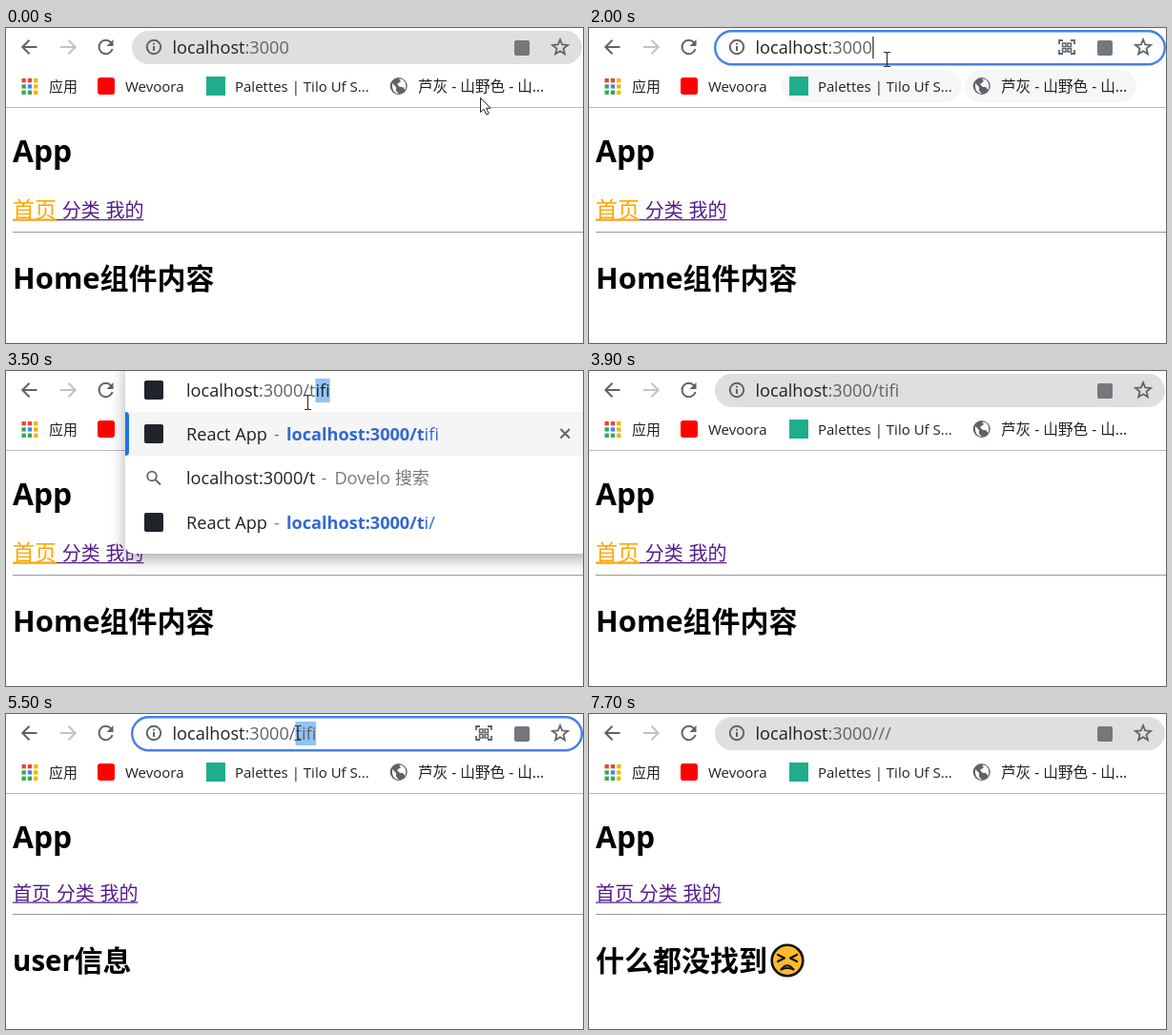
An HTML page for the animation above (8 s loop, 605 by 331 pixels).

```html
<!DOCTYPE html>
<html lang="zh-CN">
<head>
<meta charset="utf-8">
<title>App</title>
<style>
html, body { margin: 0; width: 100%; height: 100%; overflow: hidden; background: #fff; }
svg { display: block; width: 605px; height: 331px; }
text { font-family: 'Open Sans', 'Noto Sans CJK SC', 'Noto Sans CJK', sans-serif; white-space: pre; }
.menu { filter: drop-shadow(0 6px 8px rgba(60, 60, 70, .42)); }
</style>
</head>
<body>
<svg id="stage" viewBox="0 0 605 331" xmlns="http://www.w3.org/2000/svg"></svg>
<script>
const LOOP = 8000, STEP = 100, SIZE = 18.15;
const INK = '#202124', GREY = '#5f6368', PALE = '#777b80', BLUE = '#3367d6';
const VISITED = '#551a8b', ORANGE = '#ffa500', MARK = '#90c3f8';
const HOST = 'localhost', PORT = ':3000', NAME = 'tifi', FIND = 'Dovelo 搜索';
const stage = document.getElementById('stage');
const pen = document.createElement('canvas').getContext('2d');

const width = (s, size = SIZE) => {
  pen.font = `${size}px 'Open Sans', 'Noto Sans CJK SC', sans-serif`;
  return pen.measureText(s).width;
};
const text = (x, y, s, size = SIZE, fill = INK, weight = 400) =>
  `<text x="${x}" y="${y}" font-size="${size}" fill="${fill}" font-weight="${weight}">${s}</text>`;
const span = (s, fill, weight = 400) => `<tspan fill="${fill}" font-weight="${weight}">${s}</tspan>`;
const rect = (x, y, w, h, fill, rx = 0, more = '') =>
  `<rect x="${x}" y="${y}" width="${w}" height="${h}" fill="${fill}" rx="${rx}" ${more}/>`;
const line = (d, stroke, w = 2, more = '') =>
  `<path d="${d}" fill="none" stroke="${stroke}" stroke-width="${w}" ${more}/>`;
const circle = (x, y, r, fill, more = '') => `<circle cx="${x}" cy="${y}" r="${r}" fill="${fill}" ${more}/>`;

// last entry whose time has been reached
const at = (list, t) => list.reduce((hit, e) => e[0] <= t ? e : hit);

const pages = [[0, 'Home'], [800, 'Mine'], [1000, 'Category'], [1500, 'Home'], [4000, 'user'], [6800, 'none']];

// time, path, first selected character, end of selection
const address = [
  [0, ''], [800, '/mine'], [1000, '/category'], [1500, ''],
  [2100, '', 0, 14], [2300, '', 10, 14], [2800, ''], [3000, '/'],
  [3500, '/' + NAME, 16, 19], [3600, '/' + NAME, 17, 19], [3700, '/' + NAME],
  [5100, '/' + NAME, 18, 19], [5200, '/' + NAME, 17, 19], [5300, '/' + NAME, 16, 19],
  [5400, '/' + NAME, 15, 19], [6200, '//'], [6300, '///', 16, 17], [6700, '///']
];
const focus = [[0, 0], [1900, 1], [3900, 0], [4900, 1], [6700, 0]];

// time, typed path, completions (empty string marks the search row)
const menus = [
  [0], [3000, '/', ['category', '', NAME, 'mine', 'ti/', 'category', 'mine']],
  [3500, '/t', ['ifi', '', 'i/']], [3600, '/ti', ['fi', '', '/']], [3700, '/tifi', ['/', '', '/asd']],
  [3900], [6200, '//', ['/', '', '周七/asd asd']], [6700]
];

const cursors = [
  [0, 'arrow', 497, 73], [100, 'arrow', 511, 77], [200, 'arrow', 496, 78], [300, 'arrow', 398, 108],
  [400, 'arrow', 280, 136], [500, 'arrow', 194, 157], [600, 'arrow', 159, 169], [700, 'hand', 126, 188],
  [900, 'hand', 106, 189], [1000, 'hand', 82, 188], [1200, 'hand', 64, 189], [1300, 'hand', 44, 189],
  [1400, 'hand', 36, 189], [1600, 'arrow', 146, 146], [1700, 'arrow', 232, 92], [1800, 'arrow', 288, 56],
  [1900, 'beam', 309, 36], [2000, 'beam', 312.5, 33], [2200, 'beam', 316.5, 33], [3600, ''],
  [4700, 'beam', 316.5, 30.5], [4900, 'beam', 322, 26], [5000, 'beam', 327, 22], [5200, 'beam', 321, 21],
  [5300, 'beam', 315, 20], [5400, 'beam', 309, 20], [5500, 'beam', 306, 20], [6700, ''],
  [7200, 'beam', 306, 20], [7300, 'arrow', 400, 76], [7400, 'arrow', 474, 121],
  [7500, 'arrow', 489, 121], [7600, 'arrow', 564, 77], [7700, '']
];

const shapes = {
  arrow: '<path d="M.5 .5V15.5L4 12.2L6.6 18L9.2 16.9L6.7 11.2H11Z" fill="#fff" stroke="#222" stroke-width="1"/>',
  hand: '<path d="M-2 1.3C-2-.6 1-.6 1 1.3V8C1 6.3 4 6.3 4 8.2C4 6.9 7 7 7 9C7 8 9.5 8.2 9.5 10V16Q9.5 19 7.5 21V23H-1V21L-6.5 14C-8 11.7-5.3 10.6-4 12L-2 14.2Z" fill="#fff" stroke="#222" stroke-width="1.2"/><path d="M1 8V12M4 8.5V12M7 9.5V12" stroke="#222"/>',
  beam: '<path d="M-3.5-7.5H-1L0-6.5L1-7.5H3.5M0-6.5V6.5M-3.5 7.5H-1L0 6.5L1 7.5H3.5" fill="none" stroke="#333" stroke-width="1.2"/>'
};

function star(x, y) {
  const pts = Array.from({ length: 10 }, (_, i) => {
    const r = i % 2 ? 3.7 : 8.4, a = i * Math.PI / 5 - Math.PI / 2;
    return (x + r * Math.cos(a)).toFixed(1) + ',' + (y + r * Math.sin(a)).toFixed(1);
  });
  return `<polygon points="${pts.join(' ')}" fill="none" stroke="${GREY}" stroke-width="1.8"/>`;
}

function navIcons() {
  return line('M32.5 20H18M24.5 12.8L17.3 20L24.5 27.2', GREY) +
    line('M57 20H72M65.5 12.8L72.7 20L65.5 27.2', '#c0c3c7') +
    line('M110.2 15.3A7.2 7.2 0 1 0 111.6 22', GREY) +
    `<path d="M112.5 12V19H105.5Z" fill="${GREY}"/>`;
}

function scanIcon() {
  let s = line('M493 17V13H497M505 13H509V17M509 23V27H505M497 27H493V23', GREY, 1.8);
  for (const x of [496.5, 502]) for (const y of [16, 21.5]) s += rect(x, y, 3.5, 3.5, 'none', 0, `stroke="${GREY}" stroke-width="1.5"`);
  return s;
}

function selection(x, url, from, to) {
  if (from === undefined) return '';
  const a = x + width(url.slice(0, from)), b = x + width(url.slice(0, to));
  return rect(a, 8, b - a, 25, MARK);
}

function urlText(x, [, path, from, to], chosenInk) {
  const rest = PORT + path, cut = from - HOST.length;
  const tail = chosenInk && cut > 0 ? span(rest.slice(0, cut), GREY) + span(rest.slice(cut), INK) : span(rest, GREY);
  return selection(x, HOST + rest, from, to) + text(x, 26.5, span(HOST, INK) + tail);
}

function addressBar(entry, focused) {
  const box = focused
    ? rect(132.2, 3.2, 471.6, 35, '#fff', 17.5, 'stroke="#4480ea" stroke-width="2.4"')
    : rect(132, 3, 472, 35, '#dfdfdf', 17.5);
  let s = box + circle(155, 20, 7.2, 'none', `stroke="${GREY}" stroke-width="2"`) +
    line('M155 19V24M155 15.8V17.6', GREY) + urlText(174.5, entry) +
    rect(533, 13, 16, 16, '#74777b', 2) + star(581, 20.5);
  if (focused) {
    s += scanIcon();
    if (entry[2] === undefined) s += rect(175 + width(HOST + PORT + entry[1]), 9, 1.2, 23, INK);
  }
  return s;
}

function bookmarks(t) {
  const dots = ['#ea4335', '#ea4335', '#f5b400', '#34a853', '#4285f4', '#f5b400', '#34a853', '#34a853', '#f5b400'];
  let s = '';
  if (t >= 1700 && t < 3500) s += rect(202, 44, 188, 34, '#f6f6f7', 17);
  if (t >= 100 && t < 3500) s += rect(394, 44, 180, 34, '#f6f6f7', 17);
  dots.forEach((c, i) => s += rect(16.5 + i % 3 * 6.3, 53 + Math.floor(i / 3) * 6.3, 4.3, 4.3, c));
  return s + text(45, 67, '应用', 15) +
    rect(96, 52, 18, 18, '#f00', 3) + text(125, 67, 'Wevoora', 15) +
    rect(210, 51, 20, 20, '#1fae8c') + text(240, 67, 'Palettes | Tilo Uf S...', 15) +
    circle(411.7, 61, 9, GREY) +
    '<path d="M405 58L409 62V66L412 69Q406 69 405 62ZM412 53.5L414 56L410 59L413 62H416L418.5 65Q421 59 416 54Z" fill="#fff"/>' +
    text(432, 67, '芦灰 - 山野色 - 山...', 15.6) + rect(0, 83, 605, 1, '#b8b8b8');
}

function links(active) {
  const base = active < 0 ? 195.5 : 199, under = base + 2;
  let x = 7, s = '', hot = '';
  ['首页', '分类', '我的'].forEach((label, i) => {
    const on = i === active, size = on ? 23 : 20;
    s += text(x, base, label, size, on ? ORANGE : VISITED, 300);
    if (on) hot = rect(x, under - .5, size * 2, 2, ORANGE);
    x += size * 2 + 5.7;
  });
  return s + rect(7, under, x - 12.7, 1.2, VISITED) + hot;
}

function emoji(x, y) {
  const ink = 'stroke-linecap="round" stroke-linejoin="round"';
  return `<g transform="translate(${x} ${y})">` + circle(0, 0, 16.3, '#ffb92e', 'stroke="#111" stroke-width="2.6"') +
    line('M-10-6L-3-2.5L-10 1M10-6L3-2.5L10 1', '#111', 2.2, ink) +
    line('M-6.5 9.5Q0 1 6.5 9.5Q0 6.5-6.5 9.5Z', '#111', 2.2, ink) + '</g>';
}

function page(name) {
  const active = ['Home', 'Category', 'Mine'].indexOf(name), drop = active < 0 ? 0 : 4;
  const bold = (x, y, s, size) => text(x, y, s, size, '#000', 700);
  const y = 269.5 + drop;
  let s = bold(7, 141, 'App', 31.8) + links(active) + rect(7, 210 + drop, 598, 1, '#999');
  if (name === 'none') return s + bold(7, y, '什么都没找到', 30) + emoji(208, 259);
  if (name === 'user') return s + bold(7, y, 'user', 29.5) + bold(71.5, y, '信息', 30);
  const x = { Home: 98.5, Category: 144.5, Mine: 84 }[name];
  return s + bold(7, y, name, 31) + bold(x, y, '组件内容', 30);
}

function menu([, typed, rows], entry) {
  if (!rows) return '';
  const query = HOST + PORT + typed, badge = y => rect(145, y - 10, 20, 20, '#20232a', 2);
  let s = rect(125, -12, 500, 52 + rows.length * 46.5 + 12.5, '#fff', 9, 'class="menu"') +
    rect(125, 43, 480, 46, '#f5f5f5') + `<path d="M125 43Q129 43 129 47V85Q129 89 125 89Z" fill="#1a73e8"/>` +
    line('M581.5 61L591 70.5M591 61L581.5 70.5', GREY) + badge(20) + urlText(189, entry, true);
  if (entry[2] === undefined) s += rect(189.5 + width(query), 9, 1.2, 23, INK);
  rows.forEach((rest, i) => {
    const mid = 66 + i * 46.5, y = mid + 6.5;
    if (rest) {
      s += badge(mid) + text(189, y, 'React App') + text(281, y, '-', SIZE, PALE) +
        text(294, y, span(query, BLUE, 700) + span(rest, BLUE));
    } else {
      const end = 189 + width(query);
      s += circle(153, mid - 2, 4.8, 'none', `stroke="${GREY}" stroke-width="1.8"`) +
        line(`M156.5 ${mid + 1.5}L162 ${mid + 7}`, GREY) +
        text(189, y, query) + text(end + 6, y, '-', SIZE, PALE) + text(end + 20, y, FIND, SIZE, PALE);
    }
  });
  return s;
}

function cursor([, kind, x, y]) {
  return kind ? `<g transform="translate(${x} ${y})">${shapes[kind]}</g>` : '';
}

function draw(t) {
  const entry = at(address, t);
  stage.innerHTML = rect(0, 0, 605, 331, '#fff') + navIcons() +
    addressBar(entry, at(focus, t)[1]) + bookmarks(t) + page(at(pages, t)[1]) +
    menu(at(menus, t), entry) + cursor(at(cursors, t));
}

let start, last = -1;
function tick(now) {
  start ??= now;
  const t = Math.floor((now - start) % LOOP / STEP) * STEP;
  if (t !== last) draw(last = t);
  requestAnimationFrame(tick);
}
draw(0);
requestAnimationFrame(tick);
</script>
</body>
</html>
```
